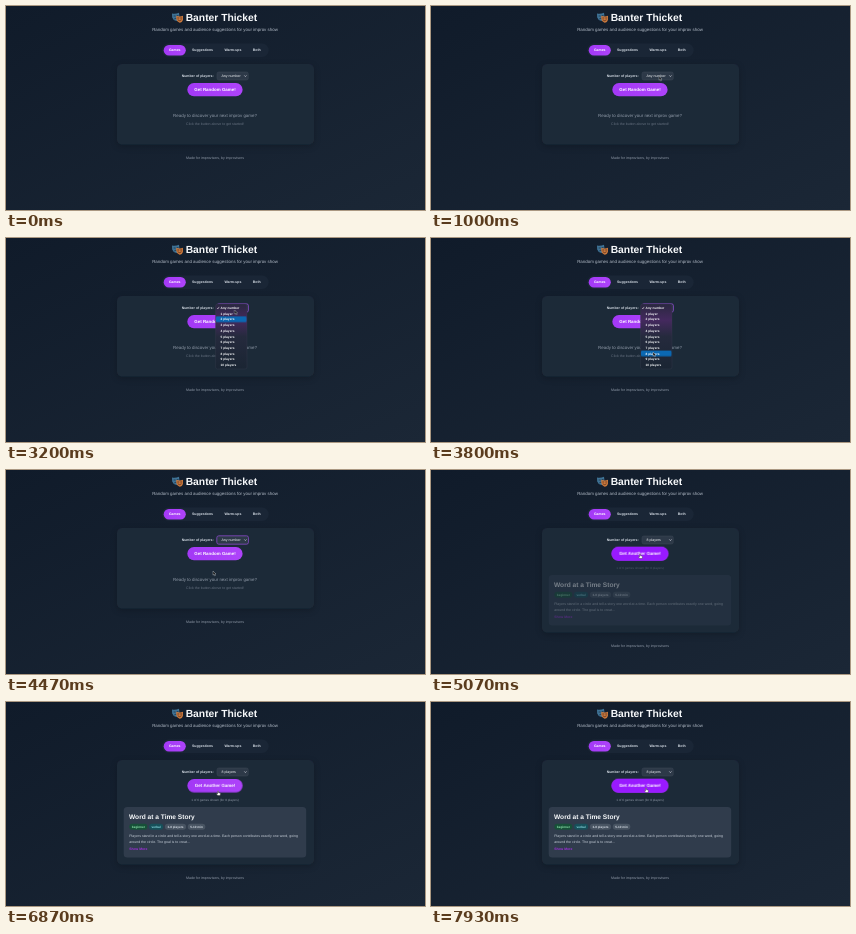
Write an HTML page that moves like this. It is 419 px wide and 204 px high and loops after 8 s.

```html
<!DOCTYPE html>
<html lang="en">
<head>
<meta charset="utf-8">
<title>Banter Thicket</title>
<style>
  html, body { margin: 0; width: 100%; height: 100%; overflow: hidden; background: #152130; }
  svg { display: block; width: 100%; height: 100%; }
  text { font-family: "Liberation Sans", Arial, sans-serif; text-rendering: geometricPrecision; }
  .bold { font-weight: 700; }
  .mid { text-anchor: middle; }
  .small { font-size: 3.55px; }
  .lead { font-size: 4.42px; }
  .bright { fill: #f7f9fb; }
  .soft { fill: #d6dde6; }
  .muted { fill: #929caa; }
  .panel { fill: #1d2938; filter: url(#shade); }
  #button { transform-box: view-box; transform-origin: 209px 84px; }
</style>
</head>
<body>
<svg viewBox="0 0 419 204">
  <defs>
    <linearGradient id="sky" x1="0" y1="0" x2="1" y2="1">
      <stop offset="0" stop-color="#101b2a"/><stop offset="1" stop-color="#1b2736"/>
    </linearGradient>
    <linearGradient id="violet">
      <stop offset="0" stop-color="#a339f6"/><stop offset="1" stop-color="#ae43fa"/>
    </linearGradient>
    <linearGradient id="glass" x1="0" y1="0" x2="0" y2="1">
      <stop offset="0" stop-color="#2a2840"/><stop offset=".25" stop-color="#44295e"/>
      <stop offset=".5" stop-color="#252a3d"/><stop offset="1" stop-color="#1a2533"/>
    </linearGradient>
    <filter id="shade" x="-10%" y="-20%" width="120%" height="150%">
      <feDropShadow dx="0" dy="2" stdDeviation="3" flood-opacity=".2"/>
    </filter>
  </defs>

  <rect width="419" height="204" fill="url(#sky)"/>

  <!-- theatre masks -->
  <g stroke-linecap="round" fill="none" stroke-width=".7">
    <path d="M166 7.500q3.500 1 7-.8l.5 4.300q-.3 3.500-3 4-3.400-.6-4.300-3.600z" fill="#3f7396"/>
    <path d="M168 10h1.200M171 9.600h1.200M168.600 12.700q1.300-1 2.600-.3" stroke="#172a3d"/>
    <path d="M170.300 9.800q3.300 1.200 6.700 0v3.700q-.8 3.200-3.500 3.300-2.900-.8-3.200-3.700z" fill="#c9793d"/>
    <path d="M171.700 12h1.200M174.600 12h1.200M172 14q1.700 1.700 3.300 0" stroke="#4a2418"/>
  </g>
  <text class="bold bright" x="179.700" y="15" font-size="10.300">Banter Thicket</text>
  <text class="mid lead" x="209" y="25" fill="#b3bcc8">Random games and audience suggestions for your improv show</text>

  <rect x="156.200" y="37.500" width="106.500" height="13.500" rx="6.700" fill="#1a2636"/>
  <g id="tabs" class="bold mid" font-size="3.500"></g>

  <g id="before">
    <rect class="panel" x="111" y="58" width="197" height="80.500" rx="5"/>
    <text class="mid lead muted" x="209" y="110.500">Ready to discover your next improv game?</text>
    <text class="mid small" x="209" y="119.200" fill="#677281">Click the button above to get started!</text>
  </g>

  <g id="after">
    <rect class="panel" x="111" y="58" width="197" height="104.500" rx="5"/>
    <g id="result">
      <text class="mid muted" x="209" y="99" font-size="3.100">1 of 6 games shown (for 8 players)</text>
      <rect x="117.700" y="105" width="182.500" height="50.500" rx="3.500" fill="#303c4c"/>
      <text class="bold bright" x="123" y="116.600" font-size="6.600">Word at a Time Story</text>
      <g id="tags" class="mid bold" font-size="3.100"></g>
      <g font-size="3.520" fill="#c8d0da">
        <text x="123.200" y="135.200">Players stand in a circle and tell a story one word at a time. Each person contributes exactly one word, going</text>
        <text x="123.200" y="141.200">around the circle. The goal is to creat...</text>
      </g>
      <text class="bold" x="123.200" y="148.300" font-size="3.400" fill="#a32fe0">Show More</text>
    </g>
  </g>
  <text id="footer" class="mid small muted" x="209" y="152.600">Made for improvisers, by improvisers</text>

  <text class="bold soft" x="175.700" y="70.800" font-size="3.500">Number of players:</text>
  <rect x="211" y="66" width="31.300" height="8" rx="1.800" fill="#2d3948" stroke="#3c4857" stroke-width=".5"/>
  <rect id="focus" x="210.800" y="65.800" width="31.700" height="8.400" rx="2" fill="none" stroke="#8546c4" stroke-width=".8"/>
  <text id="any" class="small bright" x="215.500" y="71">Any number</text>
  <text id="eight" class="small bright" x="215.500" y="71">8 players</text>
  <path d="M238.300 69.400l1.100 1.200 1.100-1.200" fill="none" stroke="#dfe5ec" stroke-width=".6"/>

  <g id="button">
    <rect x="181.300" y="77" width="55.300" height="13.300" rx="6.650" fill="url(#violet)"/>
    <rect id="hover" x="181.300" y="77" width="55.300" height="13.300" rx="6.650" fill="#991aff"/>
    <g class="bold mid" font-size="4.450" fill="#fff">
      <text id="first" x="209" y="85.300">Get Random Game!</text>
      <text id="again" x="209" y="85.300">Get Another Game!</text>
    </g>
  </g>

  <g id="menu">
    <rect x="209.500" y="66" width="31.500" height="65" rx="2" fill="url(#glass)" stroke="#3d4354" stroke-width=".3"/>
    <rect id="mark" x="210" y="67" width="30.500" height="5.700" rx="1" fill="#0b68b2"/>
    <path d="M211.200 70l.7.900 1.200-2" fill="none" stroke="#fff" stroke-width=".5"/>
    <g id="items" class="bold bright" font-size="3.200"></g>
  </g>

  <g id="cursor">
    <path id="arrow" d="M0 0v4.200l1-.9.700 1.500.7-.3-.7-1.500h1.300z" fill="#111" stroke="#c8ced6" stroke-width=".4"/>
    <path id="hand" d="M-.4 0q.5-.5.9 0v1.700l1.500.4q.6.200.5.800l-.4 1.700h-2.300l-1.400-1.700q.2-.6.800-.3l.4.300z" fill="#fff" stroke="#222" stroke-width=".4"/>
  </g>
</svg>

<script>
const LOOP = 8000, ROW = 5.7;
const OPEN = 2670, PICK = 4000, CLICK = 4930;
const $ = id => document.getElementById(id);

function add(parent, name, attrs, content = '') {
  const node = document.createElementNS('http://www.w3.org/2000/svg', name);
  for (const key in attrs) node.setAttribute(key, attrs[key]);
  node.textContent = content;
  return $(parent).appendChild(node);
}

// Lays labels out in a row, each on a pill as wide as its text plus padding.
function pills(parent, { x, y, height, pad, gap }, entries) {
  for (const [label, back, fill] of entries) {
    const pill = add(parent, 'rect', { x, y, height, rx: height / 2, fill: back });
    const text = add(parent, 'text', { y: y + height / 2 + 1.1, fill }, label);
    const width = text.getComputedTextLength() + 2 * pad;
    pill.setAttribute('width', width);
    text.setAttribute('x', x + width / 2);
    x += width + gap;
  }
}

const plain = label => [label, 'none', '#d6dde6'];
pills('tabs', { x: 157.7, y: 39, height: 10.4, pad: 5.2, gap: 1 },
  [['Games', 'url(#violet)', '#fff'], ...['Suggestions', 'Warm-ups', 'Both'].map(plain)]);
pills('tags', { x: 123.3, y: 121.8, height: 6, pad: 2.5, gap: 1.7 }, [
  ['beginner', '#175038', '#8de6ae'],
  ['verbal', '#17505a', '#8adbe2'],
  ...['3-8 players', '5-10 min'].map(label => [label, '#485462', '#d6dde6']),
]);

for (let n = 0; n <= 10; n++) {
  const label = n ? `${n} player${n > 1 ? 's' : ''}` : 'Any number';
  add('items', 'text', { x: 214.6, y: 71 + n * ROW }, label);
}

// Each step is [time, value]; the first and last values are held to the loop's ends.
function track(id, prop, steps, easing = 'linear') {
  const all = [[0, steps[0][1]], ...steps, [LOOP, steps.at(-1)[1]]];
  $(id).animate(all.map(([time, value]) => ({ offset: time / LOOP, [prop]: value, easing })),
    { duration: LOOP, iterations: Infinity });
}
const fade = (id, start, length, from = 0) =>
  track(id, 'opacity', [[start, from], [start + length, 1 - from]]);
const swap = (oldId, newId, time) => {
  fade(oldId, time, 1, 1);
  fade(newId, time, 1);
};
const during = (id, start, end, length = 1) =>
  track(id, 'opacity', [[start, 0], [start + length, 1], [end, 1], [end + length, 0]]);

during('focus', OPEN, CLICK);
during('menu', OPEN, PICK + 130, 100);
track('mark', 'transform', [[3070, 'translateY(0)'], [3730, `translateY(${8 * ROW}px)`]], 'steps(8, start)');

swap('any', 'eight', 4530);
swap('before', 'after', CLICK);
swap('first', 'again', CLICK);
fade('result', CLICK, 340);
track('footer', 'transform', [[CLICK, 'translateY(0)'], [CLICK + 1, 'translateY(24px)']]);

const hovers = [[4600, 0], [4800, 1], [5130, 1], [5330, 0], [7070, 0], [7500, 1]];
track('hover', 'opacity', hovers);
track('button', 'transform', hovers.map(([time, on]) => [time, `scale(${1 + on * 0.025})`]));

// Cursor glides: departure, arrival and the point reached.
const glides = [
  [0, 330, 174, 134],
  [330, 1070, 229, 69],
  [3070, 3800, 222, 114],
  [4200, 4470, 207, 101],
  [4470, 4800, 209, 84],
  [5070, 5470, 227, 104],
  [5730, 6070, 165, 152],
  [6270, 6870, 212, 89],
  [7130, 7530, 215, 86],
];
const place = ([, , x, y]) => `translate(${x}px, ${y}px)`;
track('cursor', 'transform', glides.flatMap((glide, i) =>
  [[glide[0], place(glides[Math.max(i - 1, 0)])], [glide[1], place(glide)]]), 'ease-in-out');
fade('cursor', 330, 1);

const grips = [[4600, 0], [4601, 1], [5200, 1], [5201, 0], [6800, 0], [6801, 1]];
track('hand', 'opacity', grips);
track('arrow', 'opacity', grips.map(([time, on]) => [time, 1 - on]));
</script>
</body>
</html>
```
